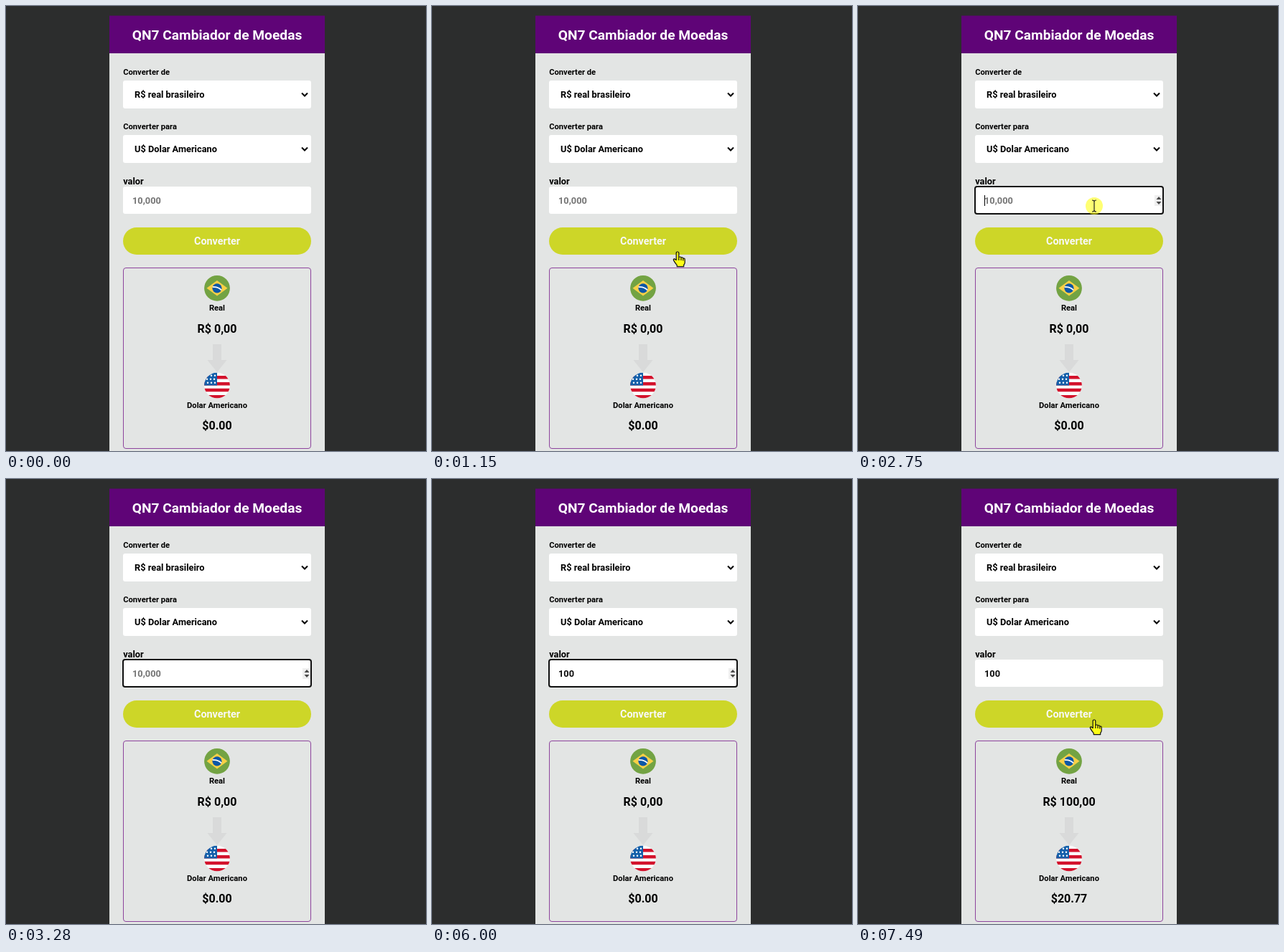
Write an HTML page that moves like this. It is 585 px wide and 621 px high and loops after 8 s.

```html
<!DOCTYPE html>
<html lang="pt-BR">
<head>
<meta charset="utf-8">
<title>Cambiador</title>
<style>
  html, body { margin: 0; width: 100%; height: 100%; overflow: hidden; background: #2c2d2d; }
  svg { display: block; width: 585px; height: 621px; font-family: Roboto, Arial, sans-serif; font-weight: 600; }
  .small { font-size: 11.2px; }
  .field { font-size: 12.8px; }
  .sum { font-size: 16px; }
  .mid { text-anchor: middle; }
</style>
</head>
<body>
<svg viewBox="0 0 585 621">
  <defs>
    <clipPath id="round"><circle cx="18" cy="17.8" r="17.9"/></clipPath>
    <path id="chevron" d="M-4 -2 L0 2 L4 -2" fill="none" stroke="#000" stroke-width="2"/>
  </defs>
  <rect width="585" height="621" fill="#2c2d2d"/>
  <rect x="144" y="14" width="300" height="607" fill="#e3e5e4"/>
  <rect x="144" y="13.5" width="300" height="52.5" fill="#5f0477"/>
  <text class="mid" x="294" y="47" font-size="19.2" font-weight="700" fill="#fff">QN7 Cambiador de Moedas</text>

  <text class="small" x="163.2" y="96">Converter de</text>
  <rect x="163" y="104" width="262" height="39" rx="3" fill="#fff"/>
  <text class="field" x="179" y="128">R$ real brasileiro</text>
  <use href="#chevron" x="416" y="123.5"/>

  <text class="small" x="163.2" y="172">Converter para</text>
  <rect x="163" y="180" width="262" height="39" rx="3" fill="#fff"/>
  <text class="field" x="179" y="204">U$ Dolar Americano</text>
  <use href="#chevron" x="416" y="199.5"/>

  <text class="field" x="163.2" y="249">valor</text>
  <rect x="163" y="252" width="262" height="38" rx="3" fill="#fff"/>
  <rect id="ring" x="163" y="252" width="262" height="38" rx="3" fill="none" stroke="#101010" stroke-width="2"/>
  <text id="value" class="field" x="176" y="276"></text>
  <rect id="caret" y="264" width="1" height="15"/>
  <g id="spinner">
    <rect x="413" y="264" width="11" height="15" fill="#efefef"/>
    <path d="M415.5 270 L419 266 L422.5 270Z M415.5 273 L419 277 L422.5 273Z" fill="#484848"/>
  </g>

  <rect x="163" y="309" width="262" height="38" rx="19" fill="#cdd628"/>
  <text class="mid" x="294" y="333" font-size="14.4" font-weight="700" fill="#f8f8f8">Converter</text>

  <rect x="163.5" y="365.5" width="261" height="252" rx="3.5" fill="none" stroke="#8d449d"/>
  <g transform="translate(276 376)" clip-path="url(#round)">
    <rect width="36" height="36" fill="#73a343"/>
    <path d="M3.5 17.8 L18 7 L32.5 17.8 L18 28.6Z" fill="#f8d046"/>
    <circle cx="18" cy="17.8" r="6.6" fill="#0d57a6"/>
    <path d="M11.8 16.2 Q19 15.2 24 20.4" fill="none" stroke="#fff" stroke-width="1.8"/>
  </g>
  <text class="small mid" x="294" y="425">Real</text>
  <text id="reais" class="sum mid" x="294" y="456"></text>

  <path d="M288 472 H300 V494 H307.5 L294 511 L280.5 494 H288Z" fill="#d9dada"/>
  <g transform="translate(276 511.7)" clip-path="url(#round)">
    <rect width="36" height="36" fill="#fbfbfb"/>
    <path d="M0 6.6 H36 M0 15.5 H36 M0 24.4 H36 M0 33.6 H36" stroke="#d3122c" stroke-width="4.5"/>
    <rect width="18" height="17.8" fill="#1560aa"/>
    <g id="stars" fill="#fff"></g>
  </g>
  <text class="small mid" x="294" y="561">Dolar Americano</text>
  <text id="dollars" class="sum mid" x="294" y="591"></text>

  <g id="cursor">
    <circle id="halo" r="12" fill="#ffff00" fill-opacity=".55"/>
    <path id="arrow" d="M1 .8 V17 L4.8 13.6 L7.4 19.4 L10 18.2 L7.5 12.7 H12.6Z" fill="#ffffb0" stroke="#111" stroke-width="1.2"/>
    <path id="hand" d="M-1.8 13 V3 Q-1.8 1 0 1 Q1.8 1 1.8 3 V8.5 Q4.6 7.2 5 9.2 Q7.4 8.3 7.8 10.2 Q10.2 9.6 10.2 12 V16 Q10.2 18 8.7 19.3 V21.6 H-.8 V19.6 Q-3.2 17 -5.2 13.4 Q-6.4 11.3 -4.6 10.8 Q-3.4 10.7 -1.8 13 M1.8 8.5 V13 M5 9.2 V13 M7.8 10.2 V13.5" fill="#fdfd16" stroke="#111" stroke-width="1.2" stroke-linejoin="round"/>
    <path id="beam" d="M-3 -8 Q0 -8 0 -6 Q0 -8 3 -8 M0 -6 V6 M-3 8 Q0 8 0 6 Q0 8 3 8" fill="none" stroke="#222" stroke-width="1.2"/>
  </g>
</svg>
<script>
  const LOOP = 8000;
  const el = id => document.getElementById(id);
  const show = (id, on) => el(id).setAttribute('visibility', on ? 'visible' : 'hidden');
  const write = (id, text) => { if (el(id).textContent !== text) el(id).textContent = text; };

  // Pointer moves: the position advances in discrete steps between start and end.
  const moves = [
    { start: 510, end: 1000, steps: 8, from: [516, 596], to: [342, 342] },
    { start: 1620, end: 1680, steps: 2, from: [346, 344], to: [350, 346] },
    { start: 1820, end: 1950, steps: 3, from: [346, 336], to: [329, 292] },
    { start: 2220, end: 2420, steps: 4, from: [329, 292], to: [329, 279] },
    { start: 2830, end: 2990, steps: 3, from: [345, 281], to: [470, 300] },
    { start: 6810, end: 7160, steps: 6, from: [573, 364], to: [329, 335] }
  ];
  const within = (t, ...spans) => spans.some(([a, b]) => t >= a && t < b);
  const easeOut = p => 1 - (1 - p) ** 2;

  function pointerAt(t) {
    const move = moves.filter(m => t >= m.start).pop() || moves[0];
    const last = move.steps - 1;
    const step = Math.floor((t - move.start) / (move.end - move.start) * last + .02);
    const p = easeOut(Math.max(0, Math.min(1, step / last)));
    return move.from.map((v, i) => v + (move.to[i] - v) * p);
  }

  function typedAt(t) {
    return '100'.slice(0, [5080, 5280, 5470].filter(k => t >= k).length);
  }

  function caretOn(t) {
    if (!within(t, [2750, 7360])) return false;
    if (within(t, [4870, 5470])) return true;
    const since = t < 4870 ? 2750 : 5470;
    return Math.floor((t - since) / 530) % 2 === 0;
  }

  function render(t) {
    const typed = typedAt(t);
    const focused = within(t, [2750, 7360]);
    const [x, y] = pointerAt(t);
    const visible = within(t, [510, 3070], [6810, LOOP]);
    const inside = x > 163 && x < 425;
    const overInput = visible && inside && y > 252 && y < 290;
    const overButton = inside && y > 309 && y < 347;

    write('value', typed || '10,000');
    el('value').setAttribute('fill', typed ? '#0c0c0c' : '#757575');
    el('caret').setAttribute('x', 176 + Math.round(typed.length * 7.3));
    show('caret', caretOn(t));
    show('ring', focused);
    show('spinner', focused || overInput);

    const done = t >= 7490;
    write('reais', done ? 'R$ 100,00' : 'R$ 0,00');
    write('dollars', done ? '$20.77' : '$0.00');

    el('cursor').setAttribute('transform', `translate(${x.toFixed(1)} ${y.toFixed(1)})`);
    show('halo', within(t, [510, 1150], [2220, 3070], [6810, 7160]));
    show('hand', visible && overButton);
    show('beam', overInput);
    show('arrow', visible && !overButton && !overInput);
  }

  for (let row = 0; row < 3; row++) {
    for (let col = 0; col < 3; col++) {
      const star = document.createElementNS('http://www.w3.org/2000/svg', 'circle');
      star.setAttribute('cx', 4 + col * 5 + (row % 2 ? 0 : 1));
      star.setAttribute('cy', 4 + row * 5);
      star.setAttribute('r', 1.2);
      el('stars').append(star);
    }
  }

  const began = performance.now();
  function tick() {
    render((performance.now() - began) % LOOP);
    requestAnimationFrame(tick);
  }
  tick();
</script>
</body>
</html>
```
